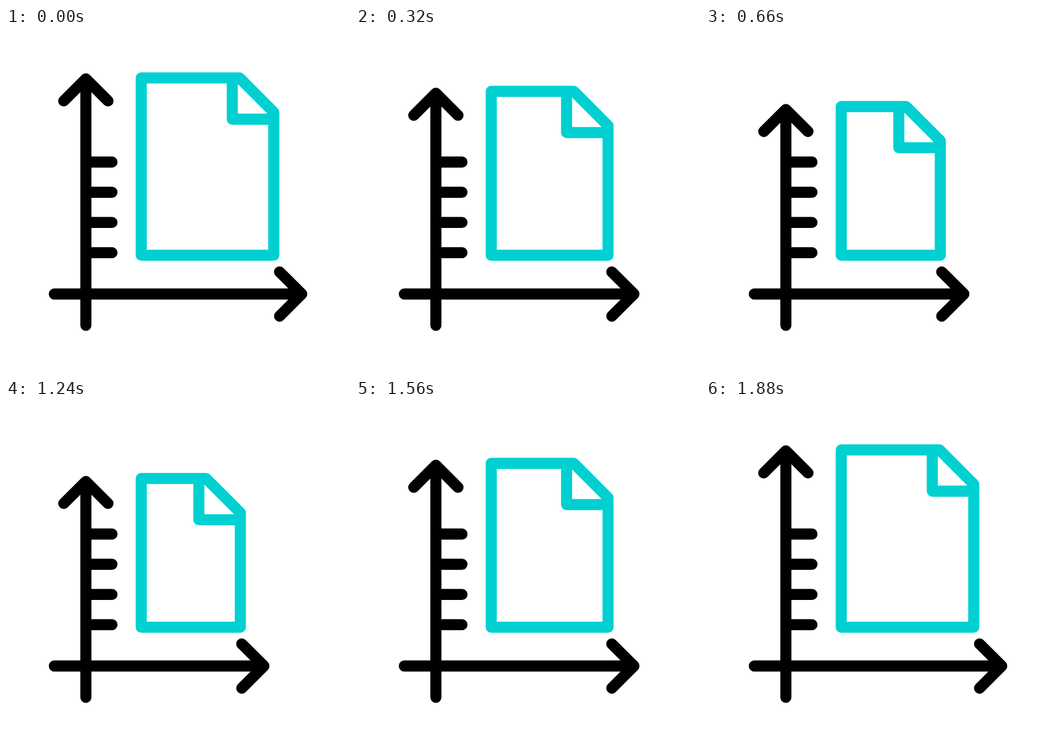
Animation, 640 px wide and 640 px high, one loop 2.4 s. Source, as an HTML page:

```html
<!DOCTYPE html>
<html lang="en">
<head>
<meta charset="utf-8">
<title>Page size</title>
<style>
  html, body { margin: 0; height: 100%; overflow: hidden; background: #fff; }
  svg { display: block; width: 100%; height: 100%; }
  path { fill: none; stroke-width: 20.6; stroke-linecap: round; stroke-linejoin: round; }
</style>
</head>
<body>
<svg viewBox="0 0 640 640">
  <path id="page" stroke="#00d0d1"/>
  <path id="axes" stroke="#000"/>
</svg>
<script>
const LOOP = 2400, MOVE = 660, BACK = 1220, STEP = 20;
const page = document.getElementById('page');
const axes = document.getElementById('axes');

// cubic-bezier(.5, 0, .5, 1)
function ease(u) {
  if (u <= 0) return 0;
  if (u >= 1) return 1;
  let lo = 0, hi = 1;
  for (let i = 0; i < 24; i++) {
    const s = (lo + hi) / 2;
    if (1.5 * s * (1 - s) + s ** 3 < u) lo = s; else hi = s;
  }
  return lo * lo * (3 - 2 * lo);
}

function draw(time) {
  const t = Math.floor(time % LOOP / STEP) * STEP;
  const shrink = ease(t / MOVE) - ease((t - BACK) / MOVE);

  const right = 498.2 - 62.3 * shrink;
  const top = 92.9 + 53.2 * shrink;
  page.setAttribute('d',
    `M251.6 ${top}H${right - 63.7}L${right} ${top + 63.8}V422.7H251.6Z` +
    `M${right - 77.2} ${top}v76.7H${right}`);

  const tipX = 550.2 - 70.4 * shrink;
  const tipY = 94.6 + 56.9 * shrink;
  const ticks = [0, 1, 2, 3].map(i => `M148.6 ${249.4 + 56.2 * i}H197.2`).join('');
  axes.setAttribute('d',
    `M89.9 494.9H${tipX}m-41.3 -41.2l41.3 41.2l-41.3 41.2` +
    `M148.6 553.2V${tipY}m-41.2 41.1l41.2 -41.1l41.2 41.1` + ticks);
}

function frame() {
  draw(performance.now());
  requestAnimationFrame(frame);
}
frame();
</script>
</body>
</html>
```
